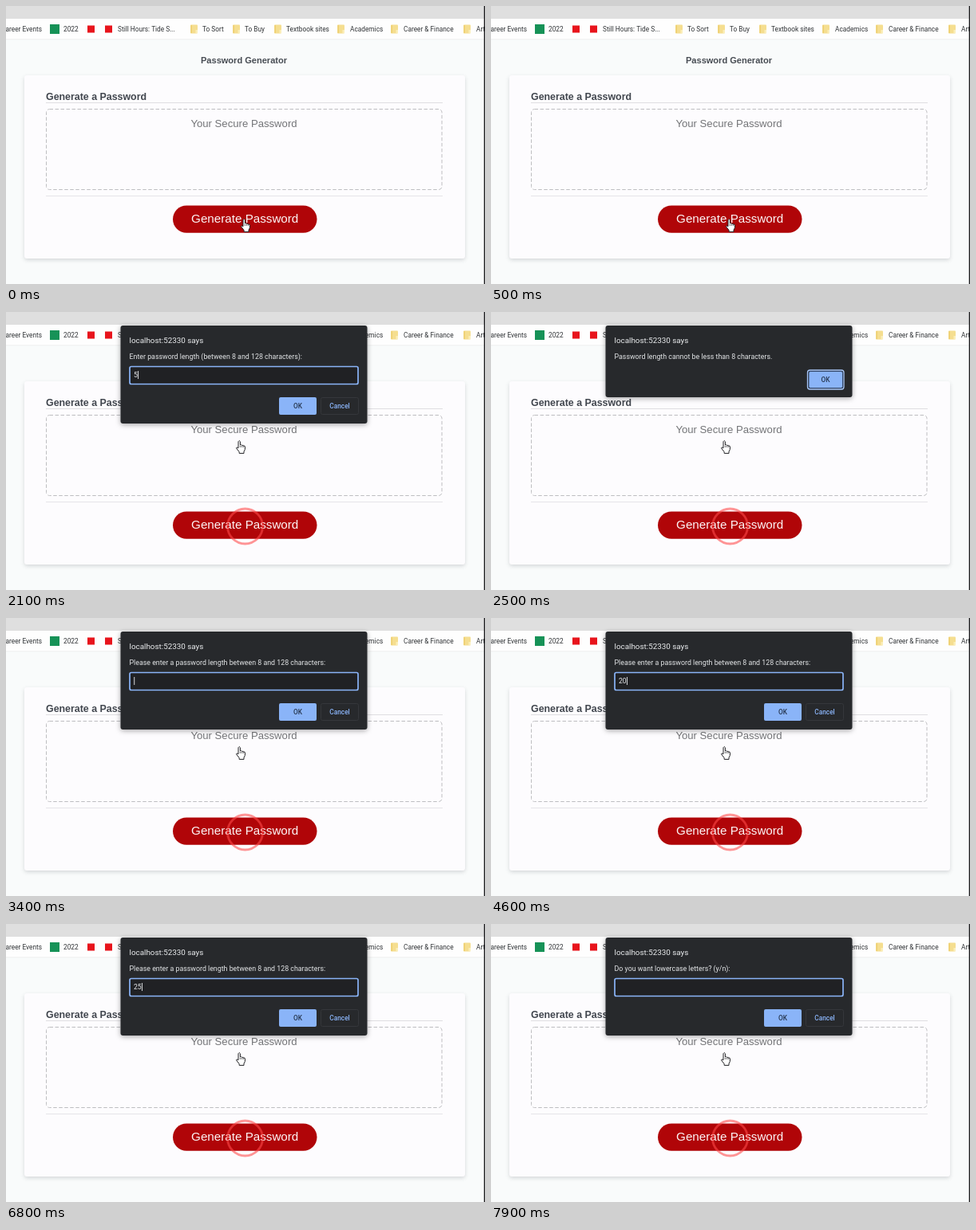
Write an HTML page with a canvas that moves like this. It is 600x349 px and loops after 8000 ms.

```html
<!DOCTYPE html>
<html lang="en">
<head>
<meta charset="utf-8">
<title>Password Generator</title>
<style>
  html, body { margin: 0; width: 100%; height: 100%; overflow: hidden; background: #f9fbfb; }
  canvas { display: block; width: 600px; height: 349px; }
</style>
</head>
<body>
<canvas id="stage"></canvas>
<script>
const W = 600, H = 349, LOOP = 8000, STEP = 100;
const UI = 'Roboto, "Open Sans", sans-serif';
const PAGE = '"Liberation Sans", Arial, sans-serif';
const BLUE = '#8ab4f8';

const canvas = document.getElementById('stage');
const ctx = canvas.getContext('2d');
const dpr = window.devicePixelRatio || 1;
canvas.width = W * dpr;
canvas.height = H * dpr;

const RETRY = 'Please enter a password length between 8 and 128 characters:';
const dialogs = [
  { from: 1000, to: 2200, text: 'Enter password length (between 8 and 128 characters):', keys: [[1900, '5']] },
  { from: 2200, to: 3000, text: 'Password length cannot be less than 8 characters.', alert: true },
  { from: 3000, to: 5600, text: RETRY, keys: [[4300, '2'], [4500, '20'], [4900, '200']] },
  { from: 5600, to: 6200, text: 'Password length cannot be greater than 128 characters.', alert: true },
  { from: 6200, to: 7300, text: RETRY, keys: [[6600, '2'], [6700, '25']] },
  { from: 7300, to: LOOP, text: 'Do you want lowercase letters? (y/n):', keys: [] }
];

const bookmarks = [
  [55, 'sheet', '2022', 72],
  [101, 'video', '', 0],
  [123, 'video', 'Still Hours: Tide S...', 140],
  [231, 'folder', 'To Sort', 246],
  [284, 'folder', 'To Buy', 299],
  [336, 'folder', 'Textbook sites', 351],
  [415, 'folder', 'Academics', 431],
  [482, 'folder', 'Career & Finance', 498],
  [573, 'folder', 'Art', 589]
];

const clamp = v => Math.max(0, Math.min(1, v));
const ease = v => v * v * (3 - 2 * v);

function rect(x, y, w, h, fill) {
  ctx.fillStyle = fill;
  ctx.fillRect(x, y, w, h);
}

function box(x, y, w, h, r, fill, stroke, line = 1) {
  ctx.beginPath();
  ctx.roundRect(x, y, w, h, r);
  if (fill) { ctx.fillStyle = fill; ctx.fill(); }
  if (stroke) { ctx.strokeStyle = stroke; ctx.lineWidth = line; ctx.stroke(); }
}

function shadow(color, blur, dy) {
  ctx.shadowColor = color;
  ctx.shadowBlur = blur * dpr;
  ctx.shadowOffsetY = dy * dpr;
}

function label(str, x, y, font, color, align = 'left') {
  ctx.font = font;
  ctx.fillStyle = color;
  ctx.textAlign = align;
  ctx.fillText(str, x, y);
}

function drawFolder(x) {
  box(x, 23.5, 9, 11, 1, '#f5de90');
  rect(x + 0.5, 24, 1.5, 10, '#eecf72');
  rect(x + 6.5, 30, 2.5, 4, '#fbeeb9');
}

function drawBrowser() {
  rect(0, 0, W, 16, '#dfdfdf');
  rect(0, 16, W, 26, '#fefefe');
  rect(0, 41.5, W, 0.8, '#ebecec');
  const font = '8.3px ' + UI;
  label('Career Events', 45, 32, font, '#303336', 'right');
  for (const [x, icon, name, tx] of bookmarks) {
    if (icon === 'folder') drawFolder(x);
    else if (icon === 'sheet') rect(x, 23, 12, 12, '#169257');
    else rect(x + 1, 24.5, 9, 9, '#e8141c');
    if (name) label(name, tx, 32, font, '#303336');
  }
}

function drawPage() {
  rect(0, 0, W, H, '#f9fbfb');
  drawBrowser();
  label('Password Generator', 298, 71.7, 'bold 11.05px ' + PAGE, '#474c53', 'center');

  ctx.save();
  shadow('rgba(70,75,85,0.2)', 5, 2);
  box(23, 87, 552, 230, 3, '#fdfcfe');
  ctx.restore();

  label('Generate a Password', 50, 118, 'bold 12.4px ' + PAGE, '#41464e');
  rect(50, 121, 497, 1, '#dfdee1');
  rect(50, 238, 497, 1, '#e6e5e8');

  ctx.setLineDash([4.5, 2.5]);
  box(50.5, 129.5, 495.5, 101, 4, null, '#bdbdc0');
  ctx.setLineDash([]);
  label('Your Secure Password', 298, 151.9, '13.15px ' + PAGE, '#737477', 'center');

  box(209, 250.5, 180.5, 34.2, 17.1, '#b00508');
  label('Generate Password', 299.2, 272.3, '15.2px ' + PAGE, '#fdf6f7', 'center');
}

// The click ring grows, then stays while the dialogs block the page
function drawRing(t) {
  if (t < 800) return;
  const k = ease(clamp((t - 700) / 300));
  ctx.beginPath();
  ctx.arc(299.5, 269, 8 + 14 * k, 0, Math.PI * 2);
  ctx.strokeStyle = 'rgba(255,75,75,0.58)';
  ctx.lineWidth = 2.8;
  ctx.stroke();
}

function drawHand(t) {
  const k = ease(clamp((t - 1000) / 300));
  ctx.save();
  ctx.translate(294 - 6 * k, 266.7 - 106 * k);
  ctx.beginPath();
  ctx.moveTo(3, 10);
  ctx.lineTo(3, 2);
  ctx.quadraticCurveTo(4.2, -0.4, 5.4, 2);
  ctx.lineTo(5.4, 6.2);
  ctx.quadraticCurveTo(6.8, 5.2, 7.6, 6.8);
  ctx.quadraticCurveTo(9, 5.9, 9.7, 7.4);
  ctx.quadraticCurveTo(11.2, 6.9, 11.5, 8.6);
  ctx.lineTo(11.3, 12);
  ctx.lineTo(10, 14.5);
  ctx.lineTo(10, 16.7);
  ctx.lineTo(4.2, 16.7);
  ctx.lineTo(4, 14.7);
  ctx.lineTo(0.5, 10.2);
  ctx.quadraticCurveTo(0.8, 8.3, 3, 10);
  ctx.closePath();
  ctx.fillStyle = '#fff';
  ctx.fill();
  ctx.strokeStyle = '#202024';
  ctx.lineWidth = 1;
  ctx.lineJoin = 'round';
  ctx.stroke();
  ctx.beginPath();
  for (const x of [5.4, 7.6, 9.7]) {
    ctx.moveTo(x, 7);
    ctx.lineTo(x, 9.3);
  }
  ctx.lineWidth = 0.7;
  ctx.stroke();
  ctx.restore();
}

function button(name, x, y, w, h, color) {
  label(name, x + w / 2, y + h / 2 + 2.9, '500 8.3px ' + UI, color, 'center');
}

function drawField(d, t) {
  box(155, 68.5, 286, 22, 2, '#202124', BLUE, 1.7);
  let value = '', since = d.from;
  for (const [at, str] of d.keys) {
    if (t >= at) { value = str; since = at; }
  }
  label(value, 160, 82, '8.6px ' + UI, '#e8eaed');
  if ((t - since) % 1000 < 500) {
    rect(160 + ctx.measureText(value).width + 0.3, 74, 0.9, 10, '#e8eaed');
  }
  box(342, 107, 47, 22, 2, BLUE);
  button('OK', 342, 107, 47, 22, '#26364f');
  box(394.5, 107.5, 47, 21, 2, null, '#35373b');
  button('Cancel', 394, 107, 48, 22, BLUE);
}

function drawAlertButton(focused) {
  if (focused) {
    box(396.5, 73, 45.5, 24, 3, null, '#a9c8fa', 1.3);
    box(398, 74.5, 42.5, 21, 2, BLUE, '#33496d', 1);
  } else {
    box(397.5, 72.3, 44.5, 22, 2, BLUE);
  }
  button('OK', 397, focused ? 74 : 72.3, 44, 22, '#26364f');
}

function drawDialog(t) {
  const d = dialogs.find(d => t >= d.from && t < d.to);
  if (!d) return;
  const settled = t - d.from >= 200;
  const rise = d.alert && !settled ? 1 : 0;
  ctx.save();
  shadow('rgba(0,0,0,0.35)', 6, 1.5);
  box(143.5, 17 - rise, 309, d.alert ? 90 : 123, 3, '#27292c');
  ctx.restore();
  label('localhost:52330 says', 154.5, 39.4 - rise, '9.85px ' + UI, '#eceef0');
  label(d.text, 154.5, 58.9 - rise, '8.84px ' + UI, '#e4e6e8');
  if (d.alert) drawAlertButton(settled);
  else drawField(d, t);
}

function draw(now) {
  const t = Math.floor((now % LOOP) / STEP) * STEP;
  ctx.setTransform(dpr, 0, 0, dpr, 0, 0);
  drawPage();
  drawRing(t);
  drawDialog(t);
  drawHand(t);
  rect(598.7, 0, 1.3, H, '#1c1c1e');
}

const start = performance.now();
function tick() {
  draw(performance.now() - start);
  requestAnimationFrame(tick);
}
tick();
</script>
</body>
</html>
```
